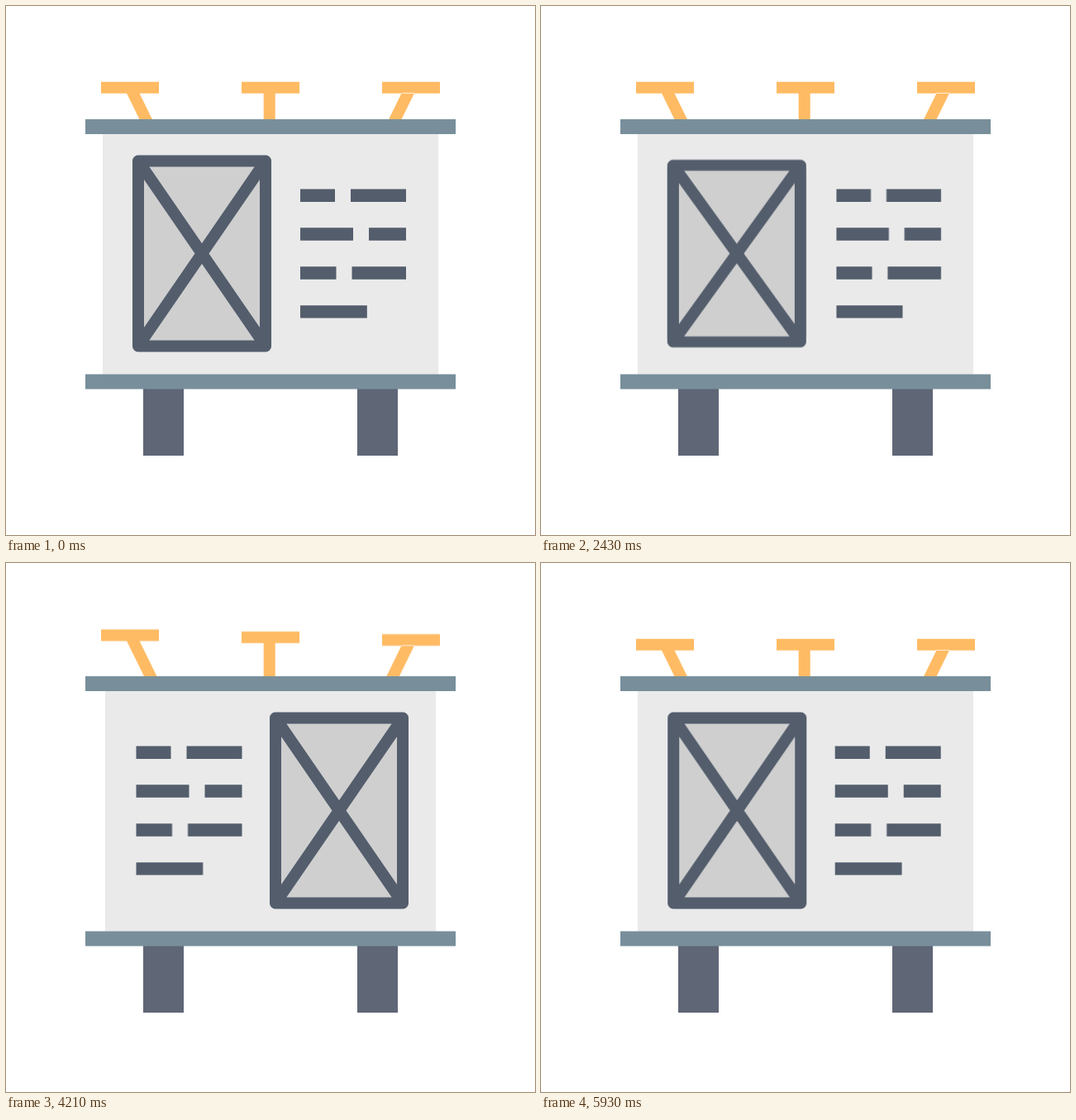
These frames come from a looping animation (640 by 640 pixels, 6 s). An HTML page:

```html
<!DOCTYPE html>
<html lang="en">
<head>
<meta charset="utf-8">
<title>Billboard</title>
<style>
  html, body { margin: 0; width: 100%; height: 100%; overflow: hidden; background: #fff; }
  svg { display: block; width: 100vw; height: 100vh; }

  svg * {
    animation: 6s cubic-bezier(.37, 0, .63, 1) infinite backwards;
  }

  /* --lag staggers the lamps from left to right */
  .ride { animation-name: ride; animation-delay: calc(var(--lag) * 55ms); }
  .bob { animation-name: bob; animation-delay: calc(var(--lag) * 83ms); }
  .lower { animation-name: lower; }
  .tall { animation-name: tall; transform-origin: 320px 300.25px; }
  .wide { animation-name: wide; transform-origin: 320px 300.25px; }
  .picture { animation-name: picture; }
  .slim { animation-name: slim; transform-origin: 237px 299.5px; }
  .outline { animation-name: outline; transform-origin: 237px 299.5px; }
  .fill { animation-name: fill; transform-origin: 236.7px 299.5px; }
  .copy { animation-name: copy; }
  .tight { animation-name: tight; transform-origin: 484px 300px; }

  @keyframes ride {
    0%, 30%, 100% { transform: translateY(0); }
    10% { transform: translateY(-26px); }
    20% { transform: translateY(22px); }
  }
  @keyframes lower {
    0%, 30%, 100% { transform: translateY(0); }
    10% { transform: translateY(26px); }
    20% { transform: translateY(-22px); }
  }
  @keyframes tall {
    0%, 30%, 100% { transform: scaleY(1); }
    10% { transform: scaleY(1.169); }
    20% { transform: scaleY(.857); }
  }
  @keyframes wide {
    0%, 68%, 96.67%, 100% { transform: scaleX(1); }
    76.67% { transform: scaleX(.9015); }
    86.67% { transform: scaleX(1.0985); }
  }
  @keyframes bob {
    0%, 63.33%, 92.55%, 100% { transform: translateY(0); }
    72.22% { transform: translateY(-13px); }
    83.67% { transform: translateY(13px); }
  }
  @keyframes picture {
    0%, 40%, 99.33%, 100% { transform: translateX(0); }
    48.33% { transform: translateX(-20px); }
    63.33% { transform: translateX(185px); }
    70%, 80% { transform: translateX(166px); }
  }
  @keyframes copy {
    0%, 40%, 99.33%, 100% { transform: translateX(0); }
    48.33% { transform: translateX(19px); }
    63.33% { transform: translateX(-217.5px); }
    70%, 80% { transform: translateX(-198.5px); }
  }
  @keyframes slim {
    0%, 48.33%, 65%, 100% { transform: scaleX(1); }
    57.2% { transform: scaleX(.886); }
  }
  @keyframes tight {
    0%, 38.89%, 65%, 100% { transform: scaleX(1); }
    48.33%, 57.2% { transform: scaleX(.86); }
  }
  @keyframes outline {
    0%, 44%, 100% { transform: scaleY(1); }
    10% { transform: scaleY(1.06); }
    21.67% { transform: scaleY(.706); }
    34.17% { transform: scaleY(1.035); }
    40% { transform: scaleY(.952); }
  }
  @keyframes fill {
    0%, 44%, 100% { transform: scale(1, 1); }
    10% { transform: scale(1, 1.08); }
    20.83% { transform: scale(1, .593); }
    34.17% { transform: scale(1, 1.05); }
    40% { transform: scale(1.1, .91); }
  }
</style>
</head>
<body>
<svg viewBox="0 0 640 640">
  <g fill="#5f6676">
    <rect x="166" y="420" width="49" height="124"/>
    <rect x="425" y="420" width="49" height="124"/>
  </g>

  <g fill="#ffbb64">
    <g class="ride" style="--lag:0"><g class="bob">
      <path d="M115 91.7h70v14h-70zM145.7 105h15.5l31.9 65h-15.5z"/>
    </g></g>
    <g class="ride" style="--lag:1"><g class="bob">
      <path d="M285 91.7h70v14h-70zM311.7 105h14v65h-14z"/>
    </g></g>
    <g class="ride" style="--lag:2"><g class="bob">
      <path d="M455 91.7h70v14h-70zM494.3 105h-15.5l-31.9 65h15.5z"/>
    </g></g>
  </g>

  <g class="tall">
    <rect class="wide" x="117" y="146" width="406" height="308.5" fill="#eaeaea"/>
  </g>
  <g fill="#788f9b">
    <rect class="ride" style="--lag:0" x="96" y="137" width="448" height="18"/>
    <rect class="lower" x="96" y="445.5" width="448" height="18"/>
  </g>

  <g class="copy">
    <path class="tight" fill="#535d6c" d="
      M356 221.5h42v15.4h-42z M417 221.5h67v15.4h-67z
      M356 268.3h64v15.4h-64z M439 268.3h45v15.4h-45z
      M356 315.3h43.5v15.4h-43.5z M418.5 315.3h65.5v15.4h-65.5z
      M356 362.2h80.8v15.4h-80.8z"/>
  </g>

  <g class="picture"><g class="slim">
    <rect class="fill" x="160" y="187.5" width="154" height="224" fill="#cfcfcf"/>
    <path class="outline" fill="none" stroke="#535d6c" stroke-width="14"
      stroke-linejoin="round" stroke-linecap="round"
      d="M160 187.5h154v224h-154zL314 411.5M314 187.5L160 411.5"/>
  </g></g>
</svg>
</body>
</html>
```
